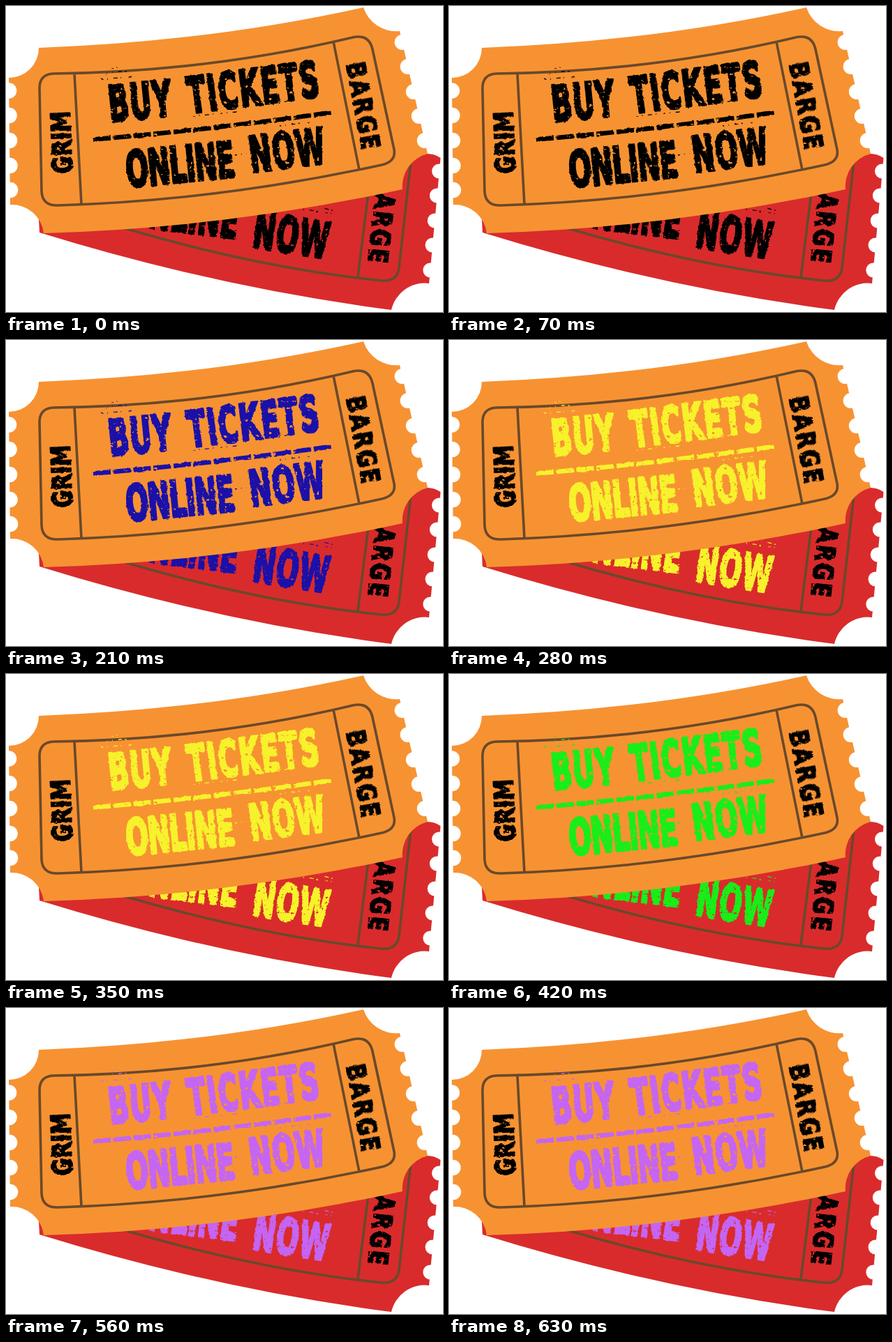
Write an HTML page that moves like this. It is 626 px wide and 439 px high and loops after 0.7 s.

```html
<!DOCTYPE html>
<html lang="en">
<head>
<meta charset="utf-8">
<title>Buy tickets online now</title>
<style>
  html, body { margin: 0; width: 100%; height: 100%; overflow: hidden; background: #fff; }
  svg { display: block; width: 626px; height: 439px; }

  .orange { fill: #f79232; }
  .red { fill: #d92b2c; }
  .bites { fill: #fff; }
  .frame { fill: none; stroke: #69492b; stroke-width: 3.6; }

  text {
    font: bold 71px "DejaVu Sans", sans-serif;
    fill: currentColor;
    stroke: currentColor;
    stroke-width: 4.2;
    stroke-linejoin: round;
  }
  .side text { font-size: 38px; stroke-width: 2.2; }
  .side, .ink { filter: url(#grunge); }
  .side { color: #000; }
  .ink { animation: ink 700ms step-end infinite; }
  .rule { fill: none; stroke: currentColor; stroke-width: 6.6; stroke-dasharray: 25 3.9; }
  .splatter { fill: none; stroke: currentColor; stroke-width: 1.3; stroke-dasharray: 3 5 1 8 6 4 2 11; }

  @keyframes ink {
    0% { color: #000; }
    20% { color: #1b10a8; }
    40% { color: #f7f22c; }
    60% { color: #18ee18; }
    80%, 100% { color: #c465f4; }
  }
</style>
</head>
<body>
<svg viewBox="0 0 626 439">
  <defs>
    <!-- Ragged edges, then worn-out specks -->
    <filter id="grunge" filterUnits="userSpaceOnUse" x="0" y="0" width="626" height="439" color-interpolation-filters="sRGB">
      <feTurbulence type="fractalNoise" baseFrequency=".13" numOctaves="3" seed="7" result="wave"/>
      <feDisplacementMap in="SourceGraphic" in2="wave" scale="3.5" xChannelSelector="R" yChannelSelector="G" result="rough"/>
      <feTurbulence type="fractalNoise" baseFrequency=".16 .22" numOctaves="3" seed="21"/>
      <feColorMatrix values="0 0 0 0 0  0 0 0 0 0  0 0 0 0 0  0 0 0 11 -2.4" result="wear"/>
      <feComposite in="rough" in2="wear" operator="in"/>
    </filter>
  </defs>

  <!-- Rear ticket -->
  <path class="red" d="M47 306 L560 215 L604 212 Q614 212 622.5 218 L606 398 A49 49 0 0 0 552 436 Q300 403 48 325Z"/>
  <g class="bites">
    <circle cx="620.5" cy="237" r="10.5"/>
    <circle cx="617.3" cy="272" r="10.5"/>
    <circle cx="614.2" cy="308" r="10.5"/>
    <circle cx="611" cy="343" r="10.5"/>
    <circle cx="607.8" cy="379" r="10.5"/>
  </g>
  <path class="frame" d="M150 313 Q355 375 538 394 Q560 396 563 376 L580 222 M520 260 L504 389"/>
  <g class="ink">
    <text transform="translate(170 314) rotate(7) scale(.54 1)">ONLINE</text>
    <text transform="translate(351 346) rotate(8.5) scale(.54 1)" letter-spacing="2">NOW</text>
    <path class="splatter" d="M335 302 L352 299 M418 290 L474 299 M440 286 L470 294"/>
  </g>
  <g class="side">
    <text transform="translate(533 241) rotate(96.5) scale(.8 1)" letter-spacing="3.4">BARGE</text>
  </g>

  <!-- Front ticket -->
  <path class="orange" d="M47 60 Q293 51 512 2 A49 49 0 0 0 564 36 L604 212 A48 48 0 0 0 568 263
    Q312 319 54 326 A46 46 0 0 0 6 285 L4 103 A43 43 0 0 0 47 60Z"/>
  <g class="bites">
    <circle cx="567.6" cy="52" r="11"/>
    <circle cx="575.6" cy="87" r="11"/>
    <circle cx="583.8" cy="123" r="11"/>
    <circle cx="591.7" cy="158" r="11"/>
    <circle cx="599.7" cy="193" r="11"/>
    <circle cx="4" cy="121.5" r="11.3"/>
    <circle cx="4.5" cy="157" r="11.3"/>
    <circle cx="5" cy="193" r="11.3"/>
    <circle cx="5.5" cy="229" r="11.3"/>
    <circle cx="6" cy="264" r="11.3"/>
  </g>
  <path class="frame" d="M68 97 Q290 94.5 499 44.5 Q520 41 525 62 L556 206 Q559 223 538 228 Q305 279 75 286 Q52 287 51 266
    L48 118 Q48 98 68 97Z M98 97 L108 285 M469 51 L506 235"/>
  <g class="ink">
    <text transform="translate(149 166) rotate(-5.5) scale(.54 1)" letter-spacing="2.5">BUY</text>
    <text transform="translate(263.5 154) rotate(-7.5) scale(.54 1)" letter-spacing="3.4">TICKETS</text>
    <path class="rule" d="M125 191.5 Q297 177 468 152.5"/>
    <text transform="translate(174 260) rotate(-5.5) scale(.54 1)" letter-spacing="-2">ONLINE</text>
    <text transform="translate(351.5 239) rotate(-7.4) scale(.54 1)" letter-spacing="2">NOW</text>
    <path class="splatter" d="M137 105 L186 101 M143 97 L172 94 M151 89 L160 88 M268 158 L330 152
      M382 140 L420 134 M328 214 L345 211 M392 172 L438 166"/>
  </g>
  <g class="side">
    <text transform="translate(95 240) rotate(-92.5) scale(.8 1)">GRIM</text>
    <text transform="translate(487 83) rotate(79.3) scale(.8 1)" letter-spacing="3.4">BARGE</text>
  </g>
</svg>
</body>
</html>
```
